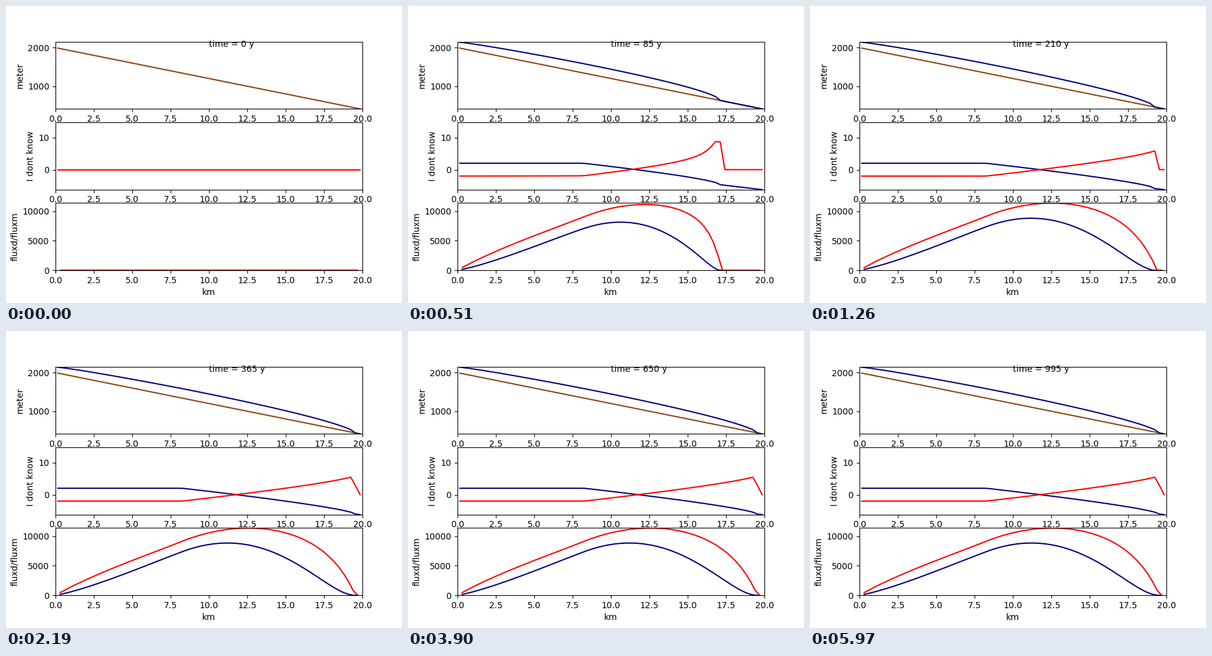
These frames come from a looping animation (640x480 px, 6000 ms). A matplotlib script:

```python
import numpy as np
import matplotlib.pyplot as plt
from matplotlib.animation import FuncAnimation

# Flowline glacier on a constant slope: internal deformation plus sliding
N, LENGTH = 66, 20000.0
DX = LENGTH / N
YEAR = 3.156e7
DRIVE = (917 * 9.81) ** 3 * YEAR
K_DEFORM = 0.4 * 1.9e-24 * DRIVE
K_SLIDE = 5.7e-20 * DRIVE
ELA, GRADIENT, MAX_GAIN = 1300.0, 0.007, 2.0

DT = 0.02
FRAMES, YEARS_PER_FRAME = 200, 5
RUN_YEARS = 1300
MARK_CELL, MARK_YEAR = 50, 45  # the ice front enters this cell in this year

x = (np.arange(N) + 0.5) * DX
faces = np.arange(1, N) * DX
bed = 2000 - 0.08 * x


def fluxes(h, z):
    edge = 0.5 * (h[1:] + h[:-1])
    slope = (z[:-1] - z[1:]) / DX
    hs = edge * slope
    cube = hs * hs * hs
    return K_DEFORM * edge * edge * cube, K_SLIDE * cube


def balance(z):
    return np.minimum(GRADIENT * (z - ELA), MAX_GAIN)


def convergence(q):
    out = np.zeros(N)
    out[:-1] = -q
    out[1:] += q
    return out / DX


def grow():
    steps = int(RUN_YEARS / DT)
    hist = np.zeros((steps, N))
    for i in range(1, steps):
        h = hist[i - 1]
        z = bed + h
        qd, qs = fluxes(h, z)
        hist[i] = np.maximum(h + DT * (balance(z) + convergence(qd + qs)), 0)
    return hist


history = grow()
marked = int(np.argmax(history[:, MARK_CELL] > 6))
start = max(marked - int(MARK_YEAR / DT), 0)


def state(i):
    if i == 0:
        return np.zeros(N), np.zeros(N), np.zeros(N), np.zeros(N - 1), np.zeros(N - 1)
    k = min(start + round(i * YEARS_PER_FRAME / DT), len(history) - 1)
    h = history[k]
    z = bed + h
    qd, qs = fluxes(h, z)
    return z, balance(z), convergence(qd + qs), qd, qs


fig, axes = plt.subplots(3, 1, figsize=(6.4, 4.8), dpi=100)
top, mid, low = axes
limits = [(412, 2156), (-6.215, 14.74), (0, 11370)]
names = ["meter", "I dont know", "fluxd/fluxm"]
for ax, lim, name in zip(axes, limits, names):
    ax.set_xlim(0, 20)
    ax.set_ylim(*lim)
    ax.set_xticks(np.arange(0, 20.1, 2.5))
    ax.set_ylabel(name)
low.set_xlabel("km")

km, face_km = x / 1000, faces / 1000
top.plot(km, bed, color="saddlebrown")
lines = [
    top.plot(km, 0 * km, color="navy")[0],
    mid.plot(km, 0 * km, color="navy")[0],
    mid.plot(km, 0 * km, color="red")[0],
    low.plot(face_km, 0 * face_km, color="navy")[0],
    low.plot(face_km, 0 * face_km, color="red")[0],
]
label = top.text(10, 2020, "")


def update(i):
    for line, data in zip(lines, state(i)):
        line.set_ydata(data)
    label.set_text(f"time = {i * YEARS_PER_FRAME} y")
    return lines + [label]


anim = FuncAnimation(fig, update, frames=FRAMES, interval=30,
                     repeat=True, repeat_delay=0)
plt.show()
```
